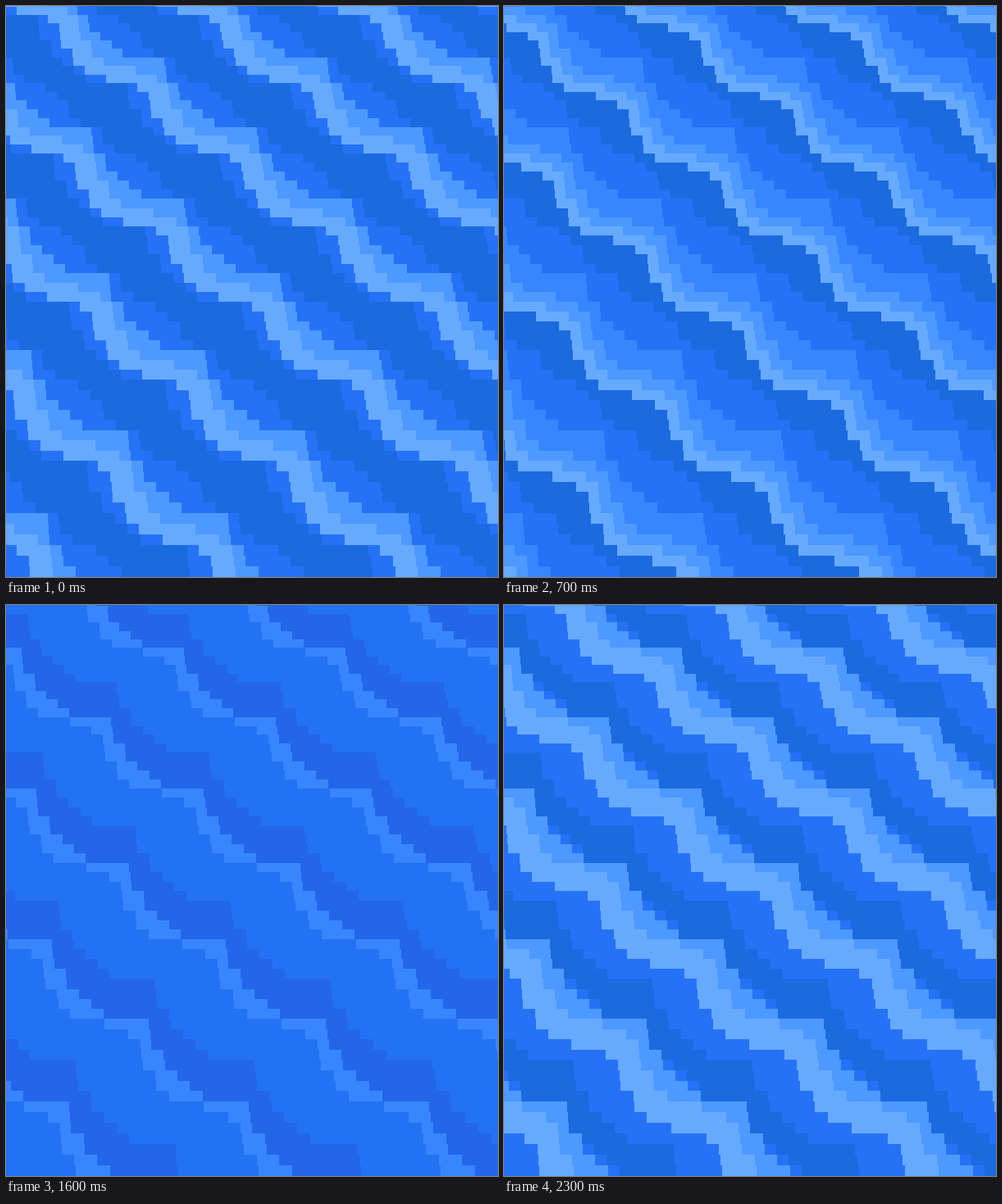
Recreate the animation shown at these times as an HTML page with a canvas. Size 600 px wide and 697 px high, loop 2.6 s.

```html
<!DOCTYPE html>
<html lang="en">
<head>
<meta charset="utf-8">
<title>Water</title>
<style>
  html, body { margin: 0; width: 100%; height: 100%; overflow: hidden; background: #2672f6; }
  canvas { display: block; width: 600px; height: 697px; }
</style>
</head>
<body>
<canvas id="stage" width="600" height="697"></canvas>
<script>
const ctx = document.getElementById('stage').getContext('2d');
const W = 600, H = 697, LOOP = 2600;

const DARK = '#1b6ae0', DEEP = '#2366ea', MID = '#2672f6',
      SOFT = '#3886ff', LIGHT = '#4d99ff', FOAM = '#66aaff';

// A wave edge is a staircase that moves 8 texels right every 8 rows.
const edge = profile => (dx, dy) => row => {
  const r = row - dy, turn = Math.floor(r / 8);
  return profile[r - turn * 8] + turn * 8 + dx;
};
const ledge = edge([0, 2, 3, 3, 3, 4, 4, 5]);
const surge = edge([-1, 2, 3, 3, 3, 4, 4, 5]);
const crest = edge([0, 0, 0, 1, 1, 2, 3, 4]);
const dip = edge([0, 1, 2, 2, 3, 5, 5, 6]);
const front = k => ledge(-k, k);   // the wave rolls down and to the left

const trough = dip(-6, 0), back = dip(10, 0), shore = crest(1, 0);
const high = crest(14, 5), low = crest(12, 5), far = crest(0, 4);

// Each band: colour, left edge, right edge; later bands cover earlier ones.
const swell = { base: DARK, bands: [
  [MID, crest(2, 0), back],
  [LIGHT, surge(1, -1), high],
  [FOAM, surge(1, -1), ledge(3, -2)]] };
const spread = { base: DARK, bands: [
  [MID, shore, back],
  [SOFT, front(0), high],
  [LIGHT, front(0), low],
  [FOAM, front(0), front(-1)]] };
const fade = { base: DARK, bands: [
  [MID, front(1), back],
  [SOFT, front(1), low],
  [LIGHT, front(1), front(-1)],
  [FOAM, front(1), front(0)]] };
const thin = { base: MID, bands: [
  [DEEP, trough, front(2)],
  [SOFT, front(2), front(0)],
  [LIGHT, front(2), front(1)]] };
const calm = { base: MID, bands: [
  [DEEP, trough, shore],
  [SOFT, front(3), front(1)],
  ['#4390ff', front(3), front(2)]] };
const still = { base: '#2472f4', bands: [
  [DEEP, far, shore],
  [SOFT, front(4), far]] };
const gather = { base: MID, bands: [
  [DARK, front(2), shore],
  [SOFT, front(5), front(2)],
  [LIGHT, front(5), far],
  [FOAM, front(5), front(4)]] };
const rise = { base: MID, bands: [
  [DARK, trough, shore],
  [MID, far, trough],
  [LIGHT, surge(-6, 6), far],
  [FOAM, surge(-6, 6), front(4)]] };

// Start time, then the pictures to show; two are mixed evenly.
const steps = [
  [0, swell], [400, spread], [700, fade], [1000, thin], [1300, thin, calm],
  [1400, calm], [1600, still], [2000, gather], [2200, gather, rise], [2300, rise]
];

// Tilted plane: texels grow towards the bottom.
const depth = v => 1 - 0.0164 * v;
const toY = v => Math.round((11 + 81.6 * v) / depth(v));
const toX = (t, v) => Math.round((14 + 8.3 * v + 12.25 * t) / depth(v));

function paint({ base, bands }) {
  ctx.fillStyle = base;
  ctx.fillRect(0, 0, W, H);
  for (const [color, from, to] of bands) {
    ctx.fillStyle = color;
    for (let row = -3; row < 61; row++) {
      const a = from(row), b = to(row);
      if (b <= a) continue;
      const y = toY(row / 8), h = toY((row + 1) / 8) - y, v = (row + 0.5) / 8;
      for (let m = -8; m < 5; m++) {
        const x = toX(a + 16 * m, v), end = toX(b + 16 * m, v);
        if (end > 0 && x < W) ctx.fillRect(x, y, end - x, h);
      }
    }
  }
}

let shown;
function tick() {
  const time = performance.now() % LOOP;
  const step = steps.filter(s => s[0] <= time).pop();
  if (step !== shown) {
    shown = step;
    const [, first, second] = step;
    paint(first);
    if (second) {
      const under = ctx.getImageData(0, 0, W, H);
      paint(second);
      const over = ctx.getImageData(0, 0, W, H);
      over.data.forEach((c, i) => { over.data[i] = (c + under.data[i]) / 2; });
      ctx.putImageData(over, 0, 0);
    }
  }
  requestAnimationFrame(tick);
}
tick();
</script>
</body>
</html>
```
